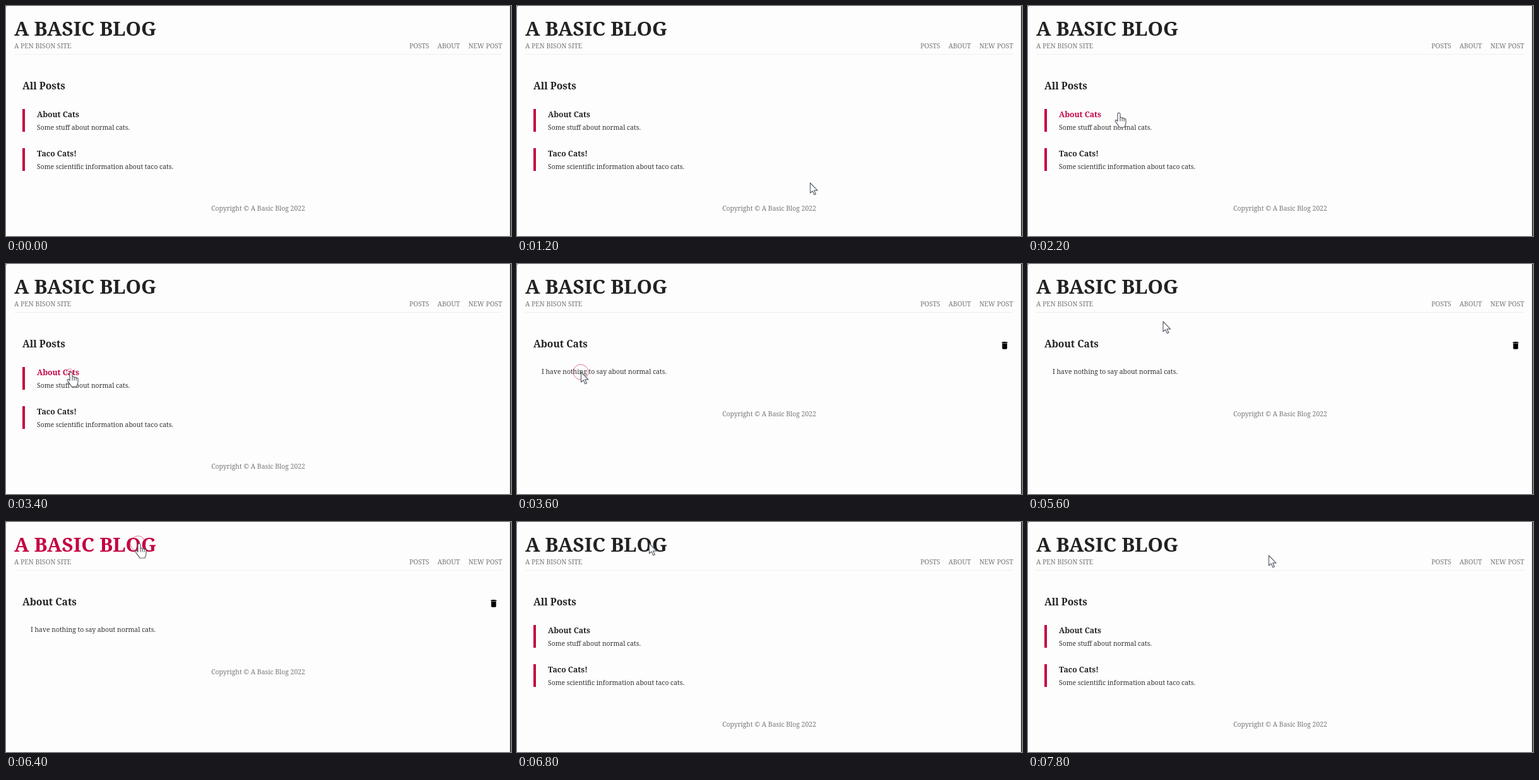
Write an HTML page that moves like this. It is 800 px wide and 364 px high and loops after 8000 ms.

```html
<!DOCTYPE html>
<html lang="en">
<head>
<meta charset="utf-8">
<title>A Basic Blog</title>
<style>
  html, body { margin: 0; width: 100%; height: 100%; overflow: hidden; background: #fefdfe; }
  svg { display: block; width: 100vw; height: 100vh; font: 10.4px "Noto Serif", serif; fill: #333; }
  .muted { fill: #777; }
  .end { text-anchor: end; }
  .mid { text-anchor: middle; }
  .head { font-weight: bold; fill: #222; }
  .h1 { font-size: 31.2px; }
  .h2 { font-size: 15.6px; }
  .h3 { font-size: 12.17px; }
  .bar, .head.hot { fill: #c40240; }
  .cursor { fill: #fff; stroke: #59626a; stroke-width: 1.2; stroke-linejoin: round; stroke-linecap: round; }
  #ring { fill: none; stroke: #c8344f; stroke-opacity: .65; }
</style>
</head>
<body>
<svg viewBox="0 0 800 364">
  <rect x="798.6" width="1.4" height="364" fill="#111"/>
  <path d="M0 0H1.5L0 1.5Z" fill="#555"/>

  <text id="title" class="head h1" x="13" y="46.5">A BASIC BLOG</text>
  <g class="muted">
    <text x="13" y="66.7">A PEN BISON SITE</text>
    <text x="639" y="66.7">POSTS</text>
    <text x="683.5" y="66.7">ABOUT</text>
    <text class="end" x="786" y="66.7">NEW POST</text>
    <text id="footer" class="mid" x="399.5">Copyright © A Basic Blog 2022</text>
  </g>
  <rect x="13" y="76" width="773" height="1" fill="#eeedf0"/>

  <g id="list">
    <text class="head h2" x="26" y="132.3">All Posts</text>
    <rect class="bar" x="26" y="163" width="4" height="36"/>
    <text id="first" class="head h3" x="49" y="176">About Cats</text>
    <text x="49" y="195.7">Some stuff about normal cats.</text>
    <rect class="bar" x="26" y="225" width="4" height="36"/>
    <text id="second" class="head h3" x="49" y="237.7">Taco Cats!</text>
    <text x="49" y="257.5">Some scientific information about taco cats.</text>
  </g>

  <g id="post">
    <text class="head h2" x="26" y="132.3">About Cats</text>
    <text x="39" y="174.2">I have nothing to say about normal cats.</text>
    <path transform="translate(764.7 121) scale(.65)" fill="#000"
      d="M6 19c0 1.1.9 2 2 2h8c1.1 0 2-.9 2-2V7H6zM19 4h-3.5l-1-1h-5l-1 1H5v2h14z"/>
  </g>

  <g id="pointer">
    <circle id="ring"/>
    <path id="arrow" class="cursor" d="M.5 0V16L4.2 12.8 6.9 18.8 9.4 17.7 6.8 11.9H12Z"/>
    <path id="hand" class="cursor" d="M0 2C0-.4 4-.4 4 2V8C4.6 6.8 7 7 7.2 8.6 8 7.6 10 8 10.2 9.6 11 8.8 13 9.2 13 11V16C13 19 11.5 20 11 23H2.5C2 20-1 18-3.6 13.6-4.4 11.8-2.4 10.8-1.2 12L0 13.4ZM4 8V13M7.2 8.6V13M10.2 9.6V13M0 10V13.4"/>
  </g>
</svg>

<script>
const LOOP = 8000, STEP = 200;
const $ = id => document.getElementById(id);
const show = (id, on) => $(id).style.display = on ? '' : 'none';

// Pointer stops: time, x, y
const stops = [
  [200, 490, 305], [1200, 464, 280], [2200, 142, 169], [3200, 101, 171], [3600, 101, 171],
  [4400, 216, 122], [5200, 216, 122], [6200, 209, 34], [7200, 209, 34], [7800, 381, 53], [LOOP, 381, 53]
];
const clicks = [3400, 6200];

function pointerAt(t) {
  const i = Math.max(1, stops.findIndex(s => s[0] >= t));
  const [t0, x0, y0] = stops[i - 1], [t1, x1, y1] = stops[i];
  const p = Math.max(0, (t - t0) / (t1 - t0));
  const e = p * p * (3 - 2 * p);
  return [x0 + (x1 - x0) * e, y0 + (y1 - y0) * e];
}

function draw(now) {
  const t = Math.floor(now % LOOP / STEP) * STEP;
  const [x, y] = pointerAt(t);
  const onPost = t >= 3600 && t < 6600;

  show('list', !onPost);
  show('post', onPost);
  $('footer').setAttribute('y', onPost ? 240.7 : 324);

  const hover = {
    title: onPost && x < 238 && y > 20 && y < 50,
    first: !onPost && y > 163 && y < 199,
    second: !onPost && y > 225 && y < 261
  };
  for (const id in hover) $(id).classList.toggle('hot', hover[id]);

  const overLink = Object.values(hover).includes(true);
  show('hand', overLink);
  show('arrow', !overLink);
  show('pointer', t >= stops[0][0]);
  $('pointer').setAttribute('transform', `translate(${x} ${y})`);

  const click = clicks.find(c => t >= c && t < c + 2 * STEP);
  show('ring', click !== undefined);
  if (click !== undefined) $('ring').setAttribute('r', 5 + (t - click) / STEP * 7);

  requestAnimationFrame(draw);
}
requestAnimationFrame(draw);
</script>
</body>
</html>
```
